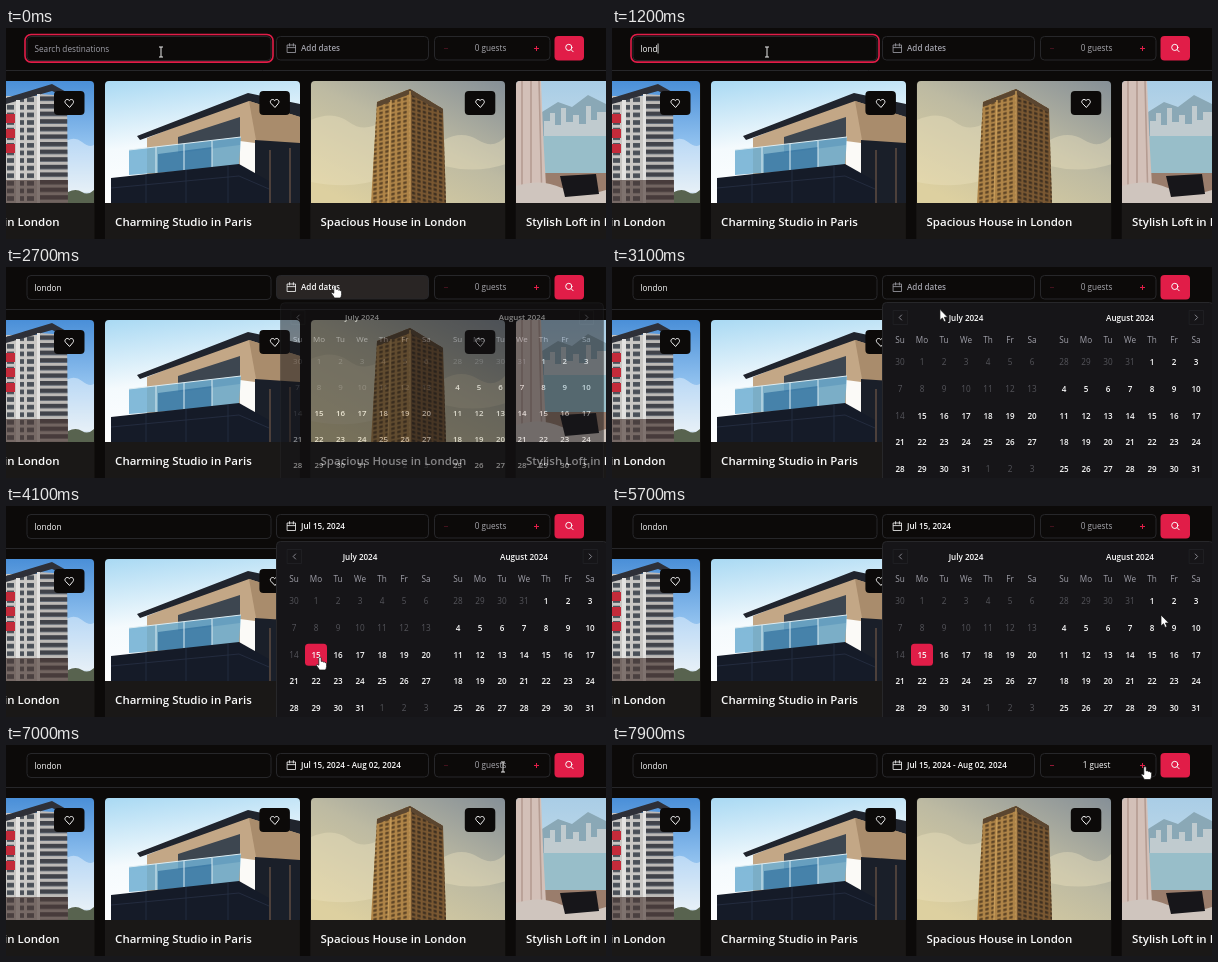
Animation of 600x211 px, one loop 8000 ms. Source, as an HTML page:

```html
<!DOCTYPE html>
<html lang="en">
<head>
<meta charset="utf-8">
<title>Stay search</title>
<style>
html, body { margin: 0; width: 100%; height: 100%; overflow: hidden; background: #0c0a09; }
svg { display: block; width: 100vw; height: 100vh; }
text { font: 8.2px "Open Sans", "Noto Sans", sans-serif; fill: #fafafa; }
.title { font-size: 11.5px; font-weight: 600; }
.mid { text-anchor: middle; }
.bold { font-weight: 600; font-size: 8.1px; }
.muted { fill: #a1a1aa; }
.box { fill: #0c0a09; stroke: #27272a; }
.icon { fill: none; stroke: #fafafa; stroke-linecap: round; stroke-linejoin: round; }
</style>
</head>
<body>
<svg viewBox="0 0 600 211" preserveAspectRatio="none">
<defs>
  <linearGradient id="sky1" x2="0" y2="1"><stop stop-color="#4a8fd8"/><stop offset=".5" stop-color="#8fc0ee"/><stop offset="1" stop-color="#e4edf2"/></linearGradient>
  <linearGradient id="sky2" x2=".2" y2="1"><stop stop-color="#a9d9f3"/><stop offset=".55" stop-color="#f4fafd"/><stop offset="1" stop-color="#fff"/></linearGradient>
  <linearGradient id="sky3" x1="1" x2=".2" y2="1"><stop stop-color="#858f97"/><stop offset=".5" stop-color="#bdbaa2"/><stop offset="1" stop-color="#ddd0a0"/></linearGradient>
  <linearGradient id="sky4" x2="0" y2="1"><stop stop-color="#a9cde6"/><stop offset="1" stop-color="#dbe8ec"/></linearGradient>
  <pattern id="flats" width="10" height="7.6" patternUnits="userSpaceOnUse"><path d="M1 1h7v4.6H1z" fill="#4a5058"/></pattern>
  <pattern id="decks" width="30" height="7.6" patternUnits="userSpaceOnUse"><path d="M0 0h30v4.6H0z" fill="#41434a"/><path d="M0 4.6h30v3H0z" fill="#bcb9b6"/></pattern>
  <pattern id="lit" width="6" height="4.4" patternUnits="userSpaceOnUse" patternTransform="skewY(-12)"><path d="M1.2 .6h3.6v2.6H1.2z" fill="#604626"/></pattern>
  <pattern id="shade" width="5.4" height="4.4" patternUnits="userSpaceOnUse" patternTransform="skewY(14)"><path d="M1 .6h3.2v2.6H1z" fill="#3f3020"/></pattern>
  <clipPath id="frame"><path d="M-107 53H84q4 0 4 4V175H-107zM99 175V57q0-4 4-4H290q4 0 4 4V175zM305 175V57q0-4 4-4H495q4 0 4 4V175zM510 175V57q0-4 4-4H705V175z"/></clipPath>
</defs>
<rect width="600" height="211" fill="#0c0a09"/>
<path d="M0 42.5H600" stroke="#27272a"/>
<g id="cards"></g>
<g clip-path="url(#frame)">
  <!-- apartment block -->
  <rect y="53" width="88" height="122" fill="url(#sky1)"/>
  <path d="M54 118q12-12 22-4t14 0v50H54z" fill="#fff" opacity=".4"/>
  <path d="M0 68H34V175H0z" fill="#c9c7c4"/>
  <path d="M0 68H34V175H0z" fill="url(#flats)"/>
  <path d="M33 66l28 2 1 107H33z" fill="url(#decks)"/>
  <path d="M0 70 46 56 62 65 60 69 46 63 0 76z" fill="#2e3038"/>
  <path d="M0 86h9v9H0zM0 101h9v9H0zM0 116h9v9H0z" fill="#c42b3a"/>
  <path d="M10 72h4V175h-4zM31 66h3V175h-3z" fill="#e3e2e0"/>
  <path d="M0 152h62v23H0z" fill="#4a3833" opacity=".65"/>
  <path d="M62 175v-11q8-4 14 0t12-2v13z" fill="#58634f"/>
  <!-- studio -->
  <rect x="99" y="53" width="195" height="122" fill="url(#sky2)"/>
  <path d="M141 110 242 70l52 12v93H141z" fill="#c3a786"/>
  <path d="M172 109l62-20v28l-62 8z" fill="#3d4650"/>
  <path d="M131 108 242 65l52 11v13L243 73 134 112z" fill="#20242d"/>
  <path d="M243 73l51 16v29l-44-6z" fill="#a98c6c"/>
  <path d="M249 112l45 3v60h-45z" fill="#1a1f29"/>
  <path d="M234 113l15 2v31l-15-6z" fill="#fbfaf7"/>
  <path d="M264 122v53M284 120v55" stroke="#5b4a40" stroke-width="1.6"/>
  <path d="M123 122l112-13-2 29-110 9z" fill="#6fb0d3" opacity=".85"/>
  <path d="M152 126l54-7v21l-54 5z" fill="#2f6f9f" opacity=".7"/>
  <path d="M123 122l112-13M150 119v26M178 116v26M206 113v27" stroke="#dcecf2" fill="none"/>
  <path d="M105 150l128-14 30 17v22H105z" fill="#151b28"/>
  <path d="M105 160l128-12 30 13M140 147v28M180 142v33M222 138v37" stroke="#273044" fill="none" stroke-width=".8"/>
  <!-- tower -->
  <rect x="305" y="53" width="195" height="122" fill="url(#sky3)"/>
  <path d="M305 92q22-10 38 2t34-2v58q-30 12-72 4zM438 112q18-10 34 0t28-4v28q-30 10-62 2z" fill="#ece2bd" opacity=".4"/>
  <path d="M371 74l33-13v114h-39z" fill="#b08548"/>
  <path d="M371 74l33-13v114h-39z" fill="url(#lit)"/>
  <path d="M404 61l33 20 3 94h-36z" fill="#7a5832"/>
  <path d="M404 61l33 20 3 94h-36z" fill="url(#shade)"/>
  <path d="M371 74l33-13 33 20v4L404 66l-33 13z" fill="#5b4630"/>
  <path d="M385 72l-3 103M404 63v112" stroke="#c79c5a" stroke-width="1.4"/>
  <!-- loft -->
  <rect x="510" y="53" width="90" height="122" fill="url(#sky4)"/>
  <path d="M536 84l16-10 14 5 16-12 18 9v40h-64z" fill="#8aa8b6"/>
  <path d="M538 110V93h6v-8h5v12h6V80h5v14h7V87h6v9h7V78h5v14h6v-8h9v26z" fill="#c0cbcf"/>
  <path d="M536 108h64v40h-64z" fill="#98bec9"/>
  <path d="M536 145h64v30h-64z" fill="#9a7d6c"/>
  <path d="M510 53h25q2 60 6 122h-31z" fill="#d3c0b8"/>
  <path d="M516 53v122M525 53v122M533 53l3 122" stroke="#b59c92" stroke-width="1.6"/>
  <path d="M510 158q25-8 46 2t44 2v13h-90z" fill="#cfc5be"/>
  <path d="M554 148l36-2 3 20-34 3z" fill="#17161a"/>
</g>
<g id="hearts"></g>
<g id="bar">
  <rect class="box" x="21" y="8.5" width="244" height="24" rx="4"/>
  <rect id="ring" x="19" y="6.5" width="248" height="27.6" rx="6" fill="none" stroke="#e11d48" stroke-width="1.6"/>
  <text id="query" x="28.5" y="23.6"></text>
  <path id="caret" d="M28.5 15.5v10" stroke="#fafafa" stroke-width=".8"/>
  <rect id="dateBox" class="box" x="270.5" y="8.5" width="152" height="23.5" rx="4"/>
  <path id="dateIcon" class="icon" stroke-width=".8" d="M281.5 17h8v7.5h-8zM281.5 19.6h8M283.6 15.6v2.4M287.4 15.6v2.4"/>
  <text id="dates" class="bold" x="295" y="23.4"></text>
  <rect class="box" x="428.5" y="8.5" width="115.5" height="23.5" rx="4"/>
  <path id="minus" d="M438 20.5h4" stroke-width=".9"/>
  <path d="M528 20.5h5M530.5 18v5" stroke="#e11d48"/>
  <text id="guests" class="mid" x="484.5" y="23.4"></text>
  <rect x="548.5" y="8" width="29.5" height="24.5" rx="4" fill="#e11d48"/>
  <g class="icon"><circle cx="562.8" cy="19.4" r="3.1"/><path d="M565.2 21.8l2 2"/></g>
</g>
<g id="popup">
  <rect x="270.5" y="35.5" width="331" height="190" rx="4" fill="#161518" stroke="#27272a"/>
  <g class="icon" stroke-width=".8"><path d="M281.5 43.5h14v14h-14zM577.5 43.5h14v14h-14z" style="stroke:#232326"/><path d="M289.6 48l-2.4 2.5 2.4 2.5M583.2 48l2.4 2.5-2.4 2.5" style="stroke:#a1a1aa"/></g>
</g>
<path id="pointer"/>
</svg>
<script>
const $ = id => document.getElementById(id);

function add(parent, tag, attrs, text = '') {
  const el = document.createElementNS('http://www.w3.org/2000/svg', tag);
  for (const k in attrs) el.setAttribute(k, attrs[k]);
  el.textContent = text;
  return parent.appendChild(el);
}

['Cozy Apartment in London', 'Charming Studio in Paris', 'Spacious House in London', 'Stylish Loft in Lisbon'].forEach((name, i) => {
  const x = -106.5 + i * 205.4, end = i == 0;
  add($('cards'), 'rect', { x, y: 53, width: 195, height: 170, rx: 4, fill: '#1a1817' });
  add($('cards'), 'text', { class: 'title', x: end ? 53.5 : x + 10.2, y: 198, 'text-anchor': end ? 'end' : 'start' }, name);
  add($('hearts'), 'rect', { x: x + 154.5, y: 63, width: 30.5, height: 24, rx: 4, fill: '#0c0a09' });
  add($('hearts'), 'path', { class: 'icon', d: `M${x + 169.8} 79.2l-3.7-3.8c-2.2-2.6 1.6-5.6 3.7-2.8c2.1-2.8 5.9.2 3.7 2.8z` });
});

// Calendar: day numbers count from July 1st, so August 2nd is 33
const START = 15, END = 33, cells = [];
[['July 2024', 288, 0, 1, 31], ['August 2024', 452, 28, 32, 62]].forEach(([name, left, first, from, to]) => {
  add($('popup'), 'text', { class: 'mid bold', x: left + 66, y: 53.5 }, name);
  ['Su', 'Mo', 'Tu', 'We', 'Th', 'Fr', 'Sa'].forEach((d, i) =>
    add($('popup'), 'text', { class: 'mid muted', x: left + i * 22, y: 76 }, d));
  for (let i = 0; i < 35; i++) {
    const day = first + i, x = left + i % 7 * 22, y = 95.2 + (i / 7 | 0) * 26.75;
    const outside = day < from || day > to;
    const off = outside || day < START;
    const rect = add($('popup'), 'rect', { x: x - 11, y: y - 11, width: 22, height: 22, rx: 3.5 });
    add($('popup'), 'text', { class: off ? 'mid' : 'mid bold', x, y: y + 3, style: off ? 'fill:#55555b' : '' },
      day < 1 ? 30 : day > 31 ? day - 31 : day);
    cells.push({ day, x, y, outside, off, rect });
  }
});

const path = [
  [0, 155, 24], [2050, 155, 24], [2300, 324, 6], [2550, 330, 16], [2700, 329, 18], [2950, 329, 20],
  [3400, 325, 105], [3800, 314, 151], [4150, 314, 151], [4800, 484, 162], [5150, 484, 154],
  [5700, 549, 109], [6000, 562, 97], [6350, 562, 97], [6850, 515, 34], [7000, 497, 22], [7150, 497, 22],
  [7650, 533, 21.5], [8000, 533, 21.5]];

const glyphs = {
  arrow: 'M0 0V11L2.5 8.7 4.2 12.4 6 11.6 4.4 8H7.8Z',
  hand: 'M-1.2 .8Q0-.8 1.2 .8V4.4Q2.6 3.8 3.2 5 4.5 4.4 5 5.6 6.5 5.2 6.6 6.8V9.5Q6.4 11.5 5.4 13H-.6Q-1.5 11-3.8 8.2-3.5 6.6-1.2 8.2Z',
  beam: 'M-2-5H2M0-5V5M-2 5H2'
};

const clamp = v => Math.max(0, Math.min(1, v));

function locate(t) {
  const i = path.findIndex(p => p[0] > t);
  const [t0, x0, y0] = path[i - 1], [t1, x1, y1] = path[i];
  const u = (t - t0) / (t1 - t0), e = u * u * (3 - 2 * u);
  return [x0 + (x1 - x0) * e, y0 + (y1 - y0) * e];
}

function draw(now) {
  const t = now % 8000, [x, y] = locate(t);
  const inBar = y > 8 && y < 32;
  const overDates = inBar && x > 270 && x < 423;

  const typed = 'london'.slice(0, [700, 900, 1000, 1200, 1300, 1500].filter(k => t >= k).length);
  const query = $('query'), focused = t < 2600;
  query.textContent = typed || 'Search destinations';
  query.style.fill = typed ? '#fafafa' : '#a1a1aa';
  $('ring').style.opacity = focused ? 1 : 0;
  $('caret').style.opacity = t >= 500 && t < 2100 ? 1 : 0;
  $('caret').setAttribute('transform', `translate(${typed ? query.getComputedTextLength() + .5 : 0})`);

  const picked = t >= 6200 ? END : t >= 4100 ? START : 0;
  const bright = picked || overDates ? '#fafafa' : '#a1a1aa';
  $('dates').textContent = ['Add dates', 'Jul 15, 2024', 'Jul 15, 2024 - Aug 02, 2024'][picked == END ? 2 : picked ? 1 : 0];
  $('dates').style.fill = $('dateIcon').style.stroke = bright;
  $('dateBox').style.fill = overDates ? '#292524' : '';

  const booked = t >= 7800;
  $('guests').textContent = booked ? '1 guest' : '0 guests';
  $('guests').style.fill = booked ? '#fafafa' : '#a8a8ae';
  $('minus').style.stroke = booked ? '#a31a3a' : '#4a1420';

  const shown = t < 5000 ? clamp((t - 2600) / 200) : clamp((6990 - t) / 150);
  const s = .95 + .05 * shown;
  $('popup').style.opacity = shown;
  $('popup').setAttribute('transform', `translate(436 50) scale(${s}) translate(-436 -50)`);

  const inPopup = shown > .5 && x > 270 && y > 35;
  let kind = 'arrow';
  for (const c of cells) {
    const hover = inPopup && !c.off && Math.abs(x - c.x) < 11 && Math.abs(y - c.y) < 11;
    const chosen = picked && (c.day == START || c.day == picked);
    const between = c.day > START && c.day < picked;
    if (hover) kind = 'hand';
    c.rect.style.fill = chosen ? '#e11d48' : hover || between ? '#292524' : 'none';
    c.rect.style.opacity = c.outside ? .5 : 1;
  }
  if (overDates || inBar && x > 522 && x < 540) kind = 'hand';
  else if (inBar && (x < 266 || x > 465 && x < 503)) kind = 'beam';

  const p = $('pointer');
  p.setAttribute('d', glyphs[kind]);
  p.setAttribute('transform', `translate(${x} ${y})`);
  p.style.fill = kind == 'beam' ? 'none' : '#fff';
  p.style.stroke = kind == 'beam' ? '#e8e8e8' : '#111';
  p.style.strokeWidth = kind == 'beam' ? 1 : .7;
  requestAnimationFrame(() => draw(performance.now()));
}
draw(performance.now());
</script>
</body>
</html>
```
